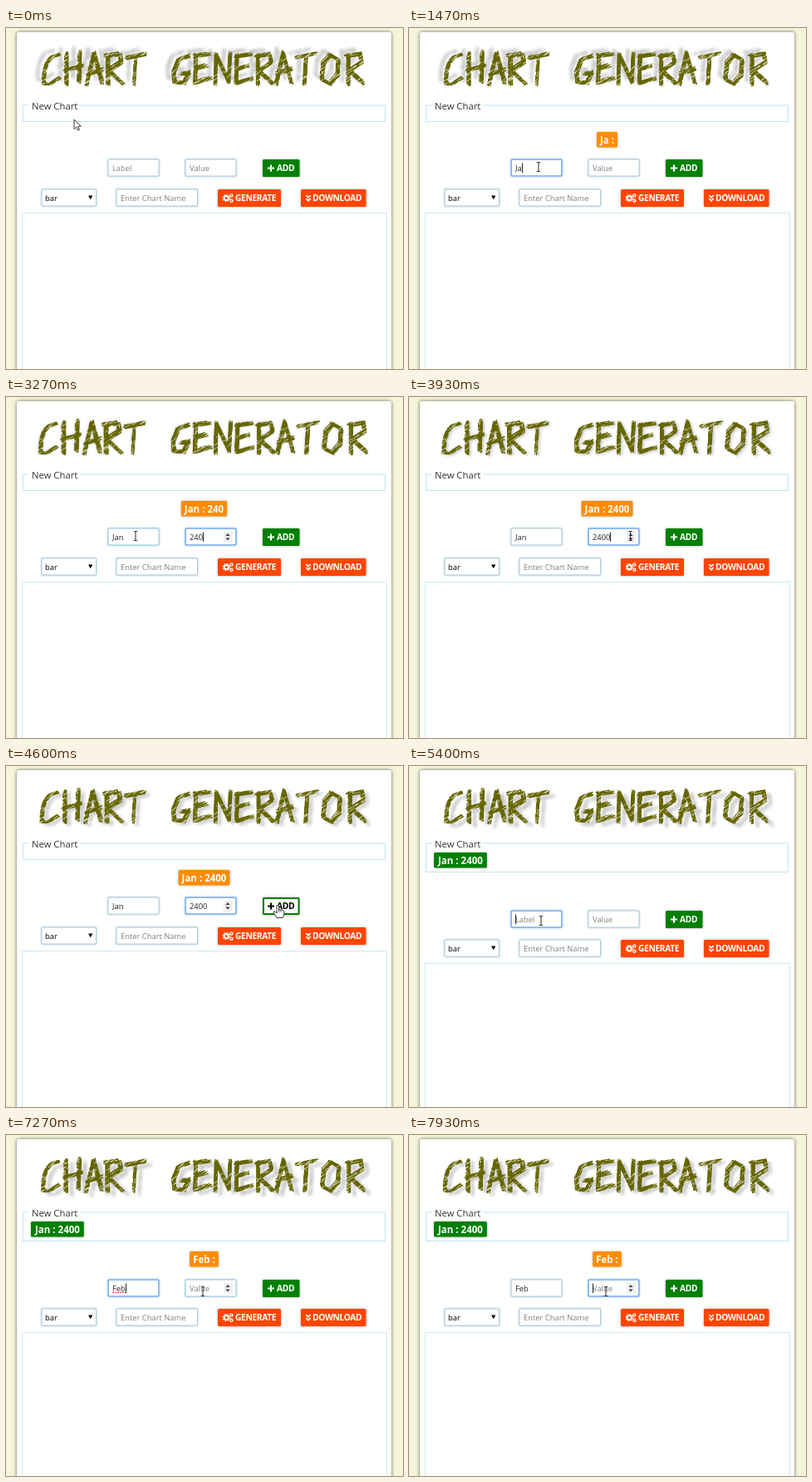
Recreate the animation shown at these times as an HTML page with a canvas. Size 478 by 410 pixels, loop 8 s.

```html
<!DOCTYPE html>
<html lang="en">
<head>
<meta charset="utf-8">
<title>Chart Generator</title>
<style>
  html, body { margin: 0; width: 100%; height: 100%; overflow: hidden; background: beige; }
  canvas { display: block; width: 478px; height: 410px; }
</style>
</head>
<body>
<canvas id="stage" width="478" height="410"></canvas>
<script>
const LOOP = 8000;
const ctx = document.getElementById('stage').getContext('2d');
const FAMILY = '"Open Sans", "Noto Sans", sans-serif';
const SMALL = `9.4px ${FAMILY}`, BUTTON = `bold 10.3px ${FAMILY}`;
const TAG = `bold 11.5px ${FAMILY}`, LEGEND = `11.3px ${FAMILY}`;
const GREEN = '#008000', ORANGE = '#ff8c00', RED = '#ff4500', PALE = '#c3e3ef';

// What the user does: changes to the form state over time.
const events = [
  [0, { label: '', value: '', focus: '', added: '' }],
  [820, { focus: 'label' }],
  [1200, { label: 'J' }], [1400, { label: 'Ja' }], [1650, { label: 'Jan' }],
  [2300, { focus: 'value' }],
  [2850, { value: '2' }], [3000, { value: '24' }],
  [3150, { value: '240' }], [3650, { value: '2400' }],
  [4700, { label: '', value: '', focus: '', added: 'Jan : 2400' }],
  [5200, { focus: 'label' }],
  [5650, { label: 'F' }], [5900, { label: 'Fe' }], [6180, { label: 'Feb' }],
  [7500, { focus: 'value' }]
];

// Pointer stops: time, x, y.
const stops = [
  [0, 82, 110], [150, 82, 110], [800, 156, 167], [3600, 156, 167], [4150, 326, 167],
  [4800, 326, 167], [5180, 159, 186], [6300, 159, 186], [6950, 237, 188], [LOOP, 237, 188]
];

function stateAt(t) {
  const state = { since: 0 };
  for (const [start, change] of events)
    if (t >= start) Object.assign(state, change, { since: start });
  return state;
}

function pointerAt(t) {
  const i = stops.findIndex((s, n) => t <= stops[n + 1][0]);
  const [t0, x0, y0] = stops[i], [t1, x1, y1] = stops[i + 1];
  const p = (t - t0) / (t1 - t0), e = p * p * (3 - 2 * p);
  return { x: x0 + (x1 - x0) * e, y: y0 + (y1 - y0) * e };
}

function text(str, x, y, font, color) {
  ctx.font = font;
  ctx.letterSpacing = font === BUTTON ? '-0.4px' : '0px';
  ctx.fillStyle = color;
  ctx.fillText(str, x, y);
  ctx.letterSpacing = '0px';
}

function rect(x, y, w, h, fill, glow, blur = 0, radius = 1.5) {
  ctx.save();
  ctx.shadowColor = glow || 'transparent';
  ctx.shadowBlur = blur;
  ctx.fillStyle = fill;
  ctx.beginPath();
  ctx.roundRect(x, y, w, h, radius);
  ctx.fill();
  ctx.restore();
}

function line(points, color, width = 1) {
  ctx.strokeStyle = color;
  ctx.lineWidth = width;
  ctx.beginPath();
  points.forEach(([x, y]) => ctx.lineTo(x, y));
  ctx.stroke();
}

function triangle(x, y, half, height, color) {
  ctx.fillStyle = color;
  ctx.beginPath();
  ctx.moveTo(x - half, y);
  ctx.lineTo(x + half, y);
  ctx.lineTo(x, y + height);
  ctx.fill();
}

// ---- Brush lettered title, painted once: bristles, then dry scratches ----
const glyphs = {
  C: 'M21 3L12 6Q1 13 2 38L8 39L21 31',
  H: 'M3 2L3 40M19 0L18 37M0 23L22 17',
  A: 'M1 40L10 2L20 38M2 27L20 21',
  R: 'M3 4L3 40M0 6L17 3L19 13L4 23L21 39',
  T: 'M-1 8L23 3M11 6L9 40',
  G: 'M20 5L8 9L2 24L3 37L14 38L20 25L10 27',
  E: 'M3 4L2 38M1 6L20 3M2 21L16 17M1 38L21 32',
  N: 'M2 40L3 4L18 36L20 2',
  O: 'M13 4L4 14L2 34L12 39L21 28L22 10L11 4'
};
const titleX = [44, 70, 96, 120, 145, 200, 226, 250, 275, 300, 324, 350, 378, 409];

let seed = 7;
const random = () => (seed = seed * 16807 % 2147483647) / 2147483647;

function paintTitle() {
  const sheet = document.createElement('canvas');
  sheet.width = 956;
  sheet.height = 180;
  const c = sheet.getContext('2d');
  c.scale(2, 2);
  c.strokeStyle = '#666600';
  c.lineWidth = 1.1;
  [...'CHARTGENERATOR'].forEach((letter, i) => {
    const path = new Path2D(glyphs[letter]);
    for (let b = 0; b < 14; b++) {
      c.save();
      c.translate(titleX[i] + (random() - .5) * 4.6, 28 + (random() - .5) * 4.6);
      c.setLineDash([6 + random() * 14, random() * 4]);
      c.lineDashOffset = random() * 20;
      c.stroke(path);
      c.restore();
    }
  });
  c.globalCompositeOperation = 'destination-out';
  c.lineWidth = .6;
  for (let n = 0; n < 420; n++) {
    const x = 40 + random() * 395, y = 24 + random() * 50, length = 3 + random() * 6;
    c.beginPath();
    c.moveTo(x, y);
    c.lineTo(x + length, y - length * .7);
    c.stroke();
  }
  return sheet;
}
const title = paintTitle();

function drawTitle(t) {
  const swing = -Math.cos(2 * Math.PI * (t - 400) / 11800);
  const scale = 1 + .021 * (1 - swing * swing);
  ctx.save();
  ctx.shadowColor = 'rgba(0,0,0,.2)';
  ctx.shadowBlur = 3;
  ctx.shadowOffsetX = 7.5 * swing;
  ctx.shadowOffsetY = 5 * swing;
  ctx.translate(237.5, 0);
  ctx.scale(scale, 1);
  ctx.drawImage(title, -237.5, 0, 478, 90);
  ctx.restore();
}

// ---- Form parts ----
function field(x, y, w, { focused, hovered } = {}) {
  const border = focused ? '#6ba4e6' : hovered ? '#95c6dc' : '#b3c8d0';
  rect(x - .5, y - .5, w, 21, border, focused ? '#8fc0ec' : '#a9cedd', 3);
  const inset = focused ? 1.3 : 1;
  rect(x - .5 + inset, y - .5 + inset, w - 2 * inset, 21 - 2 * inset, '#fff', null, 0, 1);
}

function input(x, y, w, content, placeholder, options = {}) {
  field(x, y, w, options);
  text(content || placeholder, x + 5, y + 14, SMALL, content ? '#222' : '#808080');
  if (options.caret) {
    const end = Math.round(x + 5 + (content ? ctx.measureText(content).width : 0)) + .5;
    line([[end, y + 4.5], [end, y + 16]], '#222');
  }
}

function button(x, y, w, label, labelX, color) {
  rect(x, y, w, 21, color, 'rgba(0,0,0,.35)', 3);
  text(label, labelX, y + 14.3, BUTTON, '#fff');
}

function addButton(y, hovered) {
  button(309, y, 44.5, '', 0, GREEN);
  if (hovered) rect(311, y + 2, 40.5, 17, '#fff', null, 0, 0);
  const color = hovered ? '#000' : '#fff';
  line([[315, y + 10.5], [323, y + 10.5]], color, 2);
  line([[319, y + 6.5], [319, y + 14.5]], color, 2);
  text('ADD', 326, y + 14.3, BUTTON, color);
}

function gear(x, y, r) {
  const ring = (radius, width, dash) => {
    ctx.setLineDash(dash);
    ctx.lineWidth = width;
    ctx.beginPath();
    ctx.arc(x, y, radius, 0, 2 * Math.PI);
    ctx.stroke();
  };
  ctx.strokeStyle = '#fff';
  ring(r * .6, r * .45, []);
  ring(r * .9, r * .35, [r * .353]);
  ctx.setLineDash([]);
}

function tag(str, x, y, pad, color) {
  ctx.font = TAG;
  const w = ctx.measureText(str).width + 2 * pad;
  const left = x === undefined ? 238.5 - w / 2 : x;
  rect(left, y, w, 18.5, color, 'rgba(0,0,0,.3)', 3);
  text(str, left + pad, y + 13.5, TAG, '#fff');
}

function spinner(y) {
  rect(262, y + 4, 11, 13, '#f0f0f0', null, 0, 0);
  triangle(267, y + 9, 2.7, -3, '#444');
  triangle(267, y + 11.5, 2.7, 3, '#444');
}

// ---- Pointers ----
const arrow = new Path2D('M0 0V11.5L2.7 9L4.6 13L6.5 12.2L4.7 8.2H8.2Z');
const hand = new Path2D('M0 1Q1.3-.8 2.6 1V6Q4 4.8 5 6.3Q6.4 5.3 7.2 6.9Q8.8 6.2 8.8 8.2V12L7.3 15.5H0L-3.8 9.5Q-4.4 7.3-2.3 8L0 10Z');

function drawPointer({ x, y }, kind) {
  ctx.save();
  ctx.translate(x, y);
  if (kind === 'beam') {
    line([[0, -5.5], [0, 5.5]], '#222', 1);
    for (const end of [-5.5, 5.5]) line([[-2.2, end], [2.2, end]], '#222', .9);
  } else {
    const shape = kind === 'hand' ? hand : arrow;
    ctx.fillStyle = '#fff';
    ctx.strokeStyle = '#222';
    ctx.lineWidth = .9;
    ctx.fill(shape);
    ctx.stroke(shape);
    if (kind === 'hand')
      for (const dx of [2.6, 5]) line([[dx, 5.5], [dx, 8.5]], '#222', .8);
  }
  ctx.restore();
}

function draw(t) {
  const s = stateAt(t), mouse = pointerAt(t);
  const shift = s.added ? 15 : 0;
  const row1 = 158 + (s.added ? 16 : 0), row2 = 194 + shift;
  const over = (x, w) => mouse.x >= x && mouse.x <= x + w && mouse.y >= row1 && mouse.y <= row1 + 21;
  const overLabel = over(123, 62), overValue = over(216, 62), overAdd = over(309, 44);
  const blink = Math.floor((t - s.since) / 500) % 2 === 0;
  const onLabel = s.focus === 'label', onValue = s.focus === 'value';

  rect(0, 0, 478, 410, '#f5f5dc', null, 0, 0);
  rect(13, 5, 451, 420, '#fff', 'rgba(0,0,0,.6)', 4, 3);
  drawTitle(t);

  // Collected entries
  ctx.strokeStyle = PALE;
  ctx.lineWidth = 1;
  ctx.strokeRect(20.5, 93, 436, 19.5 + shift);
  rect(28, 90, 61, 8, '#fff', null, 0, 0);
  text('New Chart', 31, 97.7, LEGEND, '#333');
  if (s.added) tag(s.added, 30, 104, 5, GREEN);

  // Entry being typed
  if (s.label) tag(`${s.label} :${s.value && ' ' + s.value}`, undefined, 125 + shift, 4, ORANGE);
  input(123, row1, 62, s.label, 'Label', { focused: onLabel, hovered: overLabel, caret: onLabel && blink });
  if (onLabel && s.label === 'Feb') {
    ctx.setLineDash([2, 1]);
    line([[128, row1 + 15.5], [144, row1 + 15.5]], '#e33');
    ctx.setLineDash([]);
  }
  input(216, row1, 62, s.value, 'Value', { focused: onValue, hovered: overValue, caret: onValue && blink });
  if (onValue || overValue) spinner(row1);
  addButton(row1, overAdd);

  // Chart options
  field(43, row2, 66.5);
  text('bar', 47, row2 + 14, SMALL, '#000');
  triangle(101.7, row2 + 7.5, 2.6, 4.8, '#000');
  input(133, row2, 98.5, '', 'Enter Chart Name');
  button(255, row2, 76, 'GENERATE', 276, RED);
  gear(265.3, row2 + 10.5, 4.3);
  gear(271.3, row2 + 7.5, 2.4);
  gear(271.3, row2 + 13.7, 2.4);
  button(355, row2, 78.5, 'DOWNLOAD', 369, RED);
  for (const dy of [7, 11])
    line([[361.3, row2 + dy], [364, row2 + dy + 2.7], [366.7, row2 + dy]], '#fff', 1.7);

  // Chart area
  ctx.strokeStyle = '#a5d3e4';
  ctx.lineWidth = 1;
  ctx.setLineDash([1, 1]);
  ctx.strokeRect(19.5, 222.5 + shift, 439, 220);
  ctx.setLineDash([]);

  drawPointer(mouse, overAdd ? 'hand' : overLabel || overValue ? 'beam' : 'arrow');
}

const start = performance.now();
function tick() {
  draw((performance.now() - start) % LOOP);
  requestAnimationFrame(tick);
}
tick();
</script>
</body>
</html>
```
